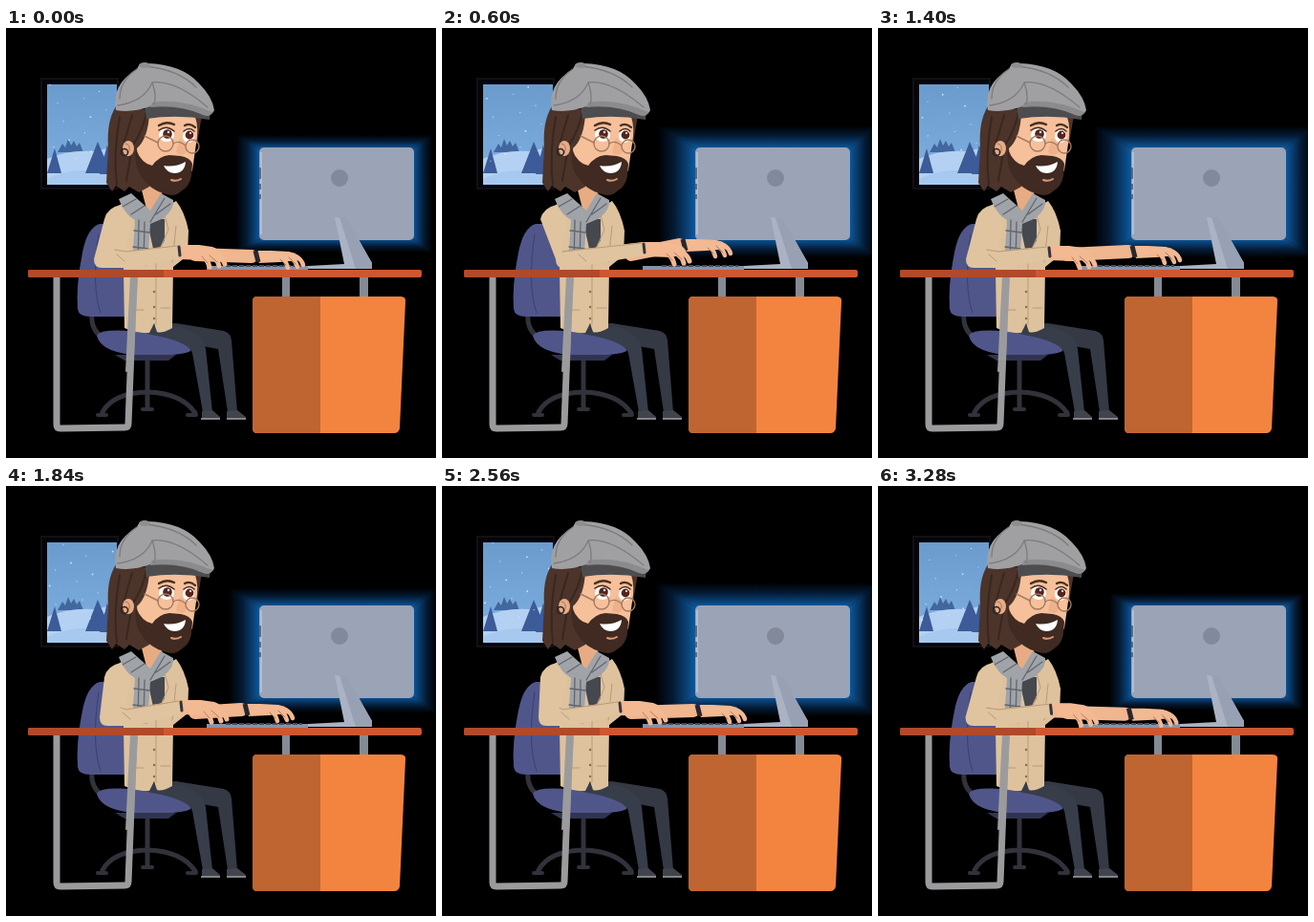
An HTML page for the animation above (3320 ms loop, 450 by 450 pixels).

```html
<!DOCTYPE html>
<html lang="en">
<head>
<meta charset="utf-8">
<title>Working at a desk</title>
<style>
html, body { margin: 0; width: 100%; height: 100%; overflow: hidden; background: #000; }
svg { display: block; width: 100vw; height: 100vh; }
.line { fill: none; stroke-linecap: round; stroke-linejoin: round; }
</style>
</head>
<body>
<svg viewBox="0 0 450 450">
  <defs>
    <linearGradient id="sky" x2="0" y2="1"><stop stop-color="#6a9bcc"/><stop offset="1" stop-color="#7fb0e2"/></linearGradient>
    <linearGradient id="fade">
      <stop stop-color="#0f62a8"/><stop offset=".25" stop-color="#0a437a"/>
      <stop offset=".6" stop-color="#041a33"/><stop offset="1" stop-color="#000"/>
    </linearGradient>
    <linearGradient id="fadeLeft" href="#fade" x1="1" x2="0"/>
    <linearGradient id="fadeRight" href="#fade"/>
    <linearGradient id="fadeTop" href="#fade" x2="0" y1="1" y2="0"/>
    <linearGradient id="fadeBottom" href="#fade" x2="0" y2="1"/>
    <clipPath id="pane"><path d="M43 59h73v105H43z"/></clipPath>
    <path id="fingers" d="M21 0Q31 0 34 12M29 -1Q41 0 44 11M34 -2Q47 -1 50 9"/>
  </defs>

  <!-- window -->
  <path d="M37 53h80v115H37z" fill="#050509" stroke="#101015" stroke-width="2"/>
  <g clip-path="url(#pane)">
    <path d="M43 59h73v105H43z" fill="url(#sky)"/>
    <path d="M54 130l5-9 3 4 3-9 3 7 3-5 3 6 3-4 4 10z" fill="#42679f"/>
    <path d="M43 137Q65 127 92 129L116 124V164H43z" fill="#b4d1f3"/>
    <path d="M43 158Q72 143 116 152V164H43z" fill="#a7c9ef"/>
    <path d="M51 126l7 26H43zM96 119l14 33H83zM106 122l9 31H98z" fill="#3c5b98"/>
    <g id="snow" fill="#d6e6f8"></g>
  </g>

  <!-- chair -->
  <g class="line" stroke="#31323a" stroke-width="5">
    <path d="M90 298Q88 318 104 325M148 342V397M148 381Q112 382 101 402M148 381Q184 382 198 403"/>
    <path d="M96 405h9M143 399h10M190 405h9" stroke-width="4"/>
  </g>
  <path d="M98 205Q85 209 80 235Q73 270 75 294Q76 302 88 302H126V205z" fill="#50568a"/>
  <path d="M97 216Q89 270 99 298" class="line" stroke="#393f70"/>
  <path d="M95 322Q98 315 130 317L187 325Q195 329 193 338Q185 343 145 343Q99 341 95 322" fill="#50568a"/>
  <path d="M114 342h64l-8 6h-46z" fill="#30344f"/>

  <!-- legs -->
  <path d="M130 312L178 309L228 317Q235 319 236 327L242 402H232L222 336L190 330z" fill="#343944"/>
  <path d="M138 313L184 313Q207 321 209 336L216 402H206L195 340Q191 328 152 321L139 318z" fill="#373d49"/>
  <path d="M205 401l11-1 8 7v2h-19zM231 401l11-1 9 7v2h-20z" fill="#41444d"/>
  <path d="M204 409h20M231 409h20" stroke="#a2a2a4" stroke-width="1.4"/>

  <!-- coat -->
  <path d="M121 184L149 198L178 181Q187 192 191 212L190 238L175 250L174 314Q163 320 158 318L155 309L150 319Q137 320 124 314L123 253L124 225L108 204Q112 188 121 184" fill="#dec29d"/>
  <path d="M147 199L166 200L166 222L156 240z" fill="#464850"/>
  <path d="M166 196L170 211L157 240V310M178 207L174 245M129 295h15M162 293h10" class="line" stroke="#b99b76"/>
  <path d="M155 276h.1M155 292h.1M155 304h.1" class="line" stroke="#8d7355" stroke-width="2.5"/>

  <!-- neck and scarf -->
  <path d="M139 158L163 166L164 190L148 193z" fill="#e8ac84"/>
  <path d="M118 179L131 173L151 191L162 173L175 180Q177 188 165 199L151 205L148 249L132 247L135 201Q124 195 118 179" fill="#a0a3a8"/>
  <path d="M122 187L136 179M131 195L145 186M151 203L166 178M134 212l16 2M133 229l16 2M139 201l-1 47M145 203l-1 45M157 195L172 184" class="line" stroke="#62666d" stroke-width="1.3"/>

  <!-- head -->
  <path d="M115 82Q105 98 107 125L105 162L111 171L115 165L124 171L129 166L139 172L150 166L152 150L200 121L205 91z" fill="#4c342a"/>
  <path d="M150 89L198 93Q202 105 199 121L195 149Q184 164 159 160L138 140L137 126Q149 115 150 89" fill="#f5c09a"/>
  <path d="M136 127Q142 142 153 144Q160 134 171 133L183 134Q193 136 195 142L194 155Q192 166 183 171Q177 177 168 174Q148 169 139 151Q134 141 136 127" fill="#402a21"/>
  <path d="M165 144Q177 146 188 140Q187 152 176 152Q168 151 165 144" fill="#fff"/>
  <path d="M173 159Q178 161 183 158" class="line" stroke="#d49a78" stroke-width="2"/>
  <path d="M147 88Q143 108 132 124L126 160M119 93Q112 132 116 164M132 91L121 129" class="line" stroke="#382720" stroke-width="2"/>
  <ellipse cx="128" cy="126" rx="6" ry="8" fill="#e7ad86"/>
  <path d="M125 121Q132 122 128 131" class="line" stroke="#ad765b"/>
  <circle cx="124" cy="130" r="3.5" class="line" stroke="#252529" stroke-width="1.5"/>
  <ellipse cx="168" cy="112" rx="8" ry="7" fill="#fff"/>
  <ellipse cx="191" cy="113" rx="6" ry="7" fill="#fff"/>
  <circle cx="169" cy="111" r="4.8" fill="#54251d"/><circle cx="192" cy="112" r="4.4" fill="#54251d"/>
  <circle cx="170" cy="109" r="1.2" fill="#fff"/><circle cx="193" cy="110" r="1.1" fill="#fff"/>
  <path d="M160 107Q168 101 176 108M186 108Q192 103 197 108" class="line" stroke="#49291e" stroke-width="1.5"/>
  <path d="M160 102Q168 97 176 101M187 102Q193 99 198 104" class="line" stroke="#49301f" stroke-width="2.4"/>
  <path d="M182 115Q192 123 188 131Q183 135 178 130" fill="#f0b18a"/>
  <g class="line" stroke="#a47b62" stroke-width="1.4">
    <circle cx="167" cy="121" r="8"/><circle cx="195" cy="124" r="7"/>
    <path d="M175 121Q181 117 188 123M159 120L145 113"/>
  </g>
  <path d="M144 74L214 84L213 96Q179 90 147 95z" fill="#4d4d50"/>
  <path d="M115 86Q110 59 137 43Q140 35 148 37Q184 38 202 58Q216 72 218 86Q215 93 207 90Q181 77 151 82Q132 89 115 86" fill="#a0a0a2"/>
  <path d="M153 78Q182 73 216 88Q214 94 206 91Q182 80 151 83z" fill="#8b8b8d"/>
  <path d="M117 81Q145 77 153 57Q177 54 211 83M145 40Q180 43 199 62M137 43Q119 55 119 74M153 57Q158 71 155 80" class="line" stroke="#7c7c7f" stroke-width="1.3"/>
  <ellipse cx="145" cy="39" rx="6" ry="3" fill="#8e8e91"/>

  <!-- monitor -->
  <path id="glowLeft" fill="url(#fadeLeft)"/>
  <path id="glowRight" fill="url(#fadeRight)"/>
  <path id="glowTop" fill="url(#fadeTop)"/>
  <path id="glowBottom" fill="url(#fadeBottom)"/>
  <rect x="265" y="125" width="162" height="97" rx="5" fill="#9ba3b7"/>
  <path d="M267 130v86" stroke="#b4bccb" stroke-width="2"/>
  <path d="M266 146v12M266 163v6M266 174v5" stroke="#485164" stroke-width="1.5"/>
  <circle cx="349" cy="157" r="9" fill="#81899b"/>
  <path d="M344 198L356 199L383 246V252H316V249L354 247z" fill="#aab2c3"/>
  <path d="M349 198h7L383 246v6h-17z" fill="#98a1b4"/>
  <path d="M210 251h106" stroke="#8793aa" stroke-width="4"/>
  <path d="M230 249h80" stroke="#444d5e" stroke-width="2" stroke-dasharray="5 2"/>

  <!-- arms -->
  <path id="farArm" class="line" stroke="#f0b68f" stroke-width="14"/>
  <g id="farHand">
    <path d="M-2 -6L16 -6L35 -5Q45 -3 48 4L25 6L4 7z" fill="#f2b992"/>
    <use href="#fingers" class="line" stroke="#f2b992" stroke-width="4.5"/>
    <path d="M26 3L32 9M35 1L42 8" class="line" stroke="#ae7559"/>
    <path d="M0 -6L3 6" stroke="#27272c" stroke-width="5"/>
  </g>
  <g id="nearHand">
    <path d="M-3 -7L20 -7L34 -5Q43 -2 44 5L28 9L-2 8z" fill="#f2b992"/>
    <use href="#fingers" class="line" stroke="#f2b992" stroke-width="5" transform="translate(-3 4)"/>
    <path d="M23 5L29 12M31 4L39 11" class="line" stroke="#b97f60"/>
  </g>
  <path id="sleeve" fill="#dfc49f"/>
  <path id="fold" class="line" stroke="#b99b76"/>
  <path id="cuff" class="line" stroke="#37343a" stroke-width="3"/>

  <!-- desk -->
  <path d="M289 261h8v20h-8zM370 261h9v20h-9z" fill="#858b94"/>
  <path d="M53 260V415Q53 419 57 419L124 418Q128 418 128 414L134 260" fill="none" stroke="#9b9b9d" stroke-width="7"/>
  <path d="M134 260L129 360" stroke="#9b9b9d" stroke-width="8"/>
  <rect x="23" y="253" width="412" height="8" rx="2" fill="#cd5730"/>
  <path d="M25 253H165V261H25Q23 261 23 259V255Q23 253 25 253" fill="#b04a2a"/>
  <path d="M263 281H413Q419 281 418 287L412 419Q411 424 406 424H263Q258 424 258 419V286Q258 281 263 281" fill="#f3843f"/>
  <path d="M263 281H329V424H263Q258 424 258 419V286Q258 281 263 281" fill="#bf6531"/>
</svg>
<script>
const LOOP = 3320, STEP = 40, TYPING = LOOP / 2, PULSE = LOOP / 3;
const $ = id => document.getElementById(id);
const set = (id, attrs) => { for (const k in attrs) $(id).setAttribute(k, attrs[k]); };

// one typing cycle: time, elbow x, near wrist x/y, far wrist x/y
const poses = [
  [0, 97, 182, 234, 261, 239],
  [180, 103, 184, 231, 250, 234],
  [600, 124, 212, 231, 252, 227],
  [900, 106, 187, 232, 267, 235],
  [1040, 105, 187, 232, 266, 235],
  [1400, 97, 180, 235, 266, 234]
];

function poseAt(i) {
  const n = poses.length, [time, ...rest] = poses[(i + n) % n];
  return [time + Math.floor(i / n) * TYPING, ...rest];
}

// smooth closed curve through the poses
function armPose(t) {
  const i = poses.findLastIndex(p => p[0] <= t);
  const [a, b, c, d] = [-1, 0, 1, 2].map(k => poseAt(i + k));
  const span = c[0] - b[0], u = (t - b[0]) / span;
  return b.map((v, k) => {
    const m0 = (c[k] - a[k]) / (c[0] - a[0]) * span;
    const m1 = (d[k] - v) / (d[0] - b[0]) * span;
    const e = u * u * (3 - 2 * u);
    return v + (c[k] - v) * e + m0 * u * (1 - u) ** 2 - m1 * u * u * (1 - u);
  }).slice(1);
}

function drawArms(t) {
  const [ex, ax, ay, bx, by] = armPose(t % TYPING);
  set('nearHand', { transform: `translate(${ax} ${ay})` });
  set('farHand', { transform: `translate(${bx} ${by})` });
  set('farArm', { d: `M198 237L${bx - 4} ${by}` });
  set('sleeve', { d: `M120 185Q106 188 103 200L${ex - 5} 242Q${ex - 5} 252 ${ex + 5} 251L135 251L${ax} ${ay + 7}L${ax - 2} ${ay - 7}L124 234L132 203z` });
  set('fold', { d: `M${ex + 17} 232L126 234L${ax - 3} ${ay - 6}M${ex + 19} 237l8 7` });
  set('cuff', { d: `M${ax - 1} ${ay - 5}l1 9` });
}

function drawGlow(t) {
  const glow = (1 + Math.cos(2 * Math.PI * (t / PULSE - .4))) / 2;
  const l = 268, r = 424, top = 128, bottom = 219;
  const L = 243 - 21 * glow, R = 445 + 13 * glow, T = 113 - 13 * glow, B = 234 + 8 * glow;
  set('glowLeft', { d: `M${L} ${T}L${l} ${top}V${bottom}L${L} ${B}z` });
  set('glowRight', { d: `M${R} ${T}L${r} ${top}V${bottom}L${R} ${B}z` });
  set('glowTop', { d: `M${L} ${T}H${R}L${r} ${top}H${l}z` });
  set('glowBottom', { d: `M${L} ${B}H${R}L${r} ${bottom}H${l}z` });
}

const flakes = Array.from({ length: 13 }, (_, i) => {
  const dot = document.createElementNS('http://www.w3.org/2000/svg', 'circle');
  dot.setAttribute('r', i % 3 ? .6 : .9);
  $('snow').append(dot);
  return { dot, x: 46 + i * 37 % 67, phase: i * .618 };
});

function drawSnow(t) {
  for (const { dot, x, phase } of flakes) {
    dot.setAttribute('cx', x + Math.sin(2 * Math.PI * (t / LOOP + phase)));
    dot.setAttribute('cy', 59 + (phase + t / LOOP) % 1 * 82);
  }
}

const start = performance.now();
function tick() {
  const now = (performance.now() - start) % LOOP;
  const t = Math.floor(now / STEP) * STEP;
  drawArms(t);
  drawGlow(t);
  drawSnow(t);
  requestAnimationFrame(tick);
}
tick();
</script>
</body>
</html>
```
